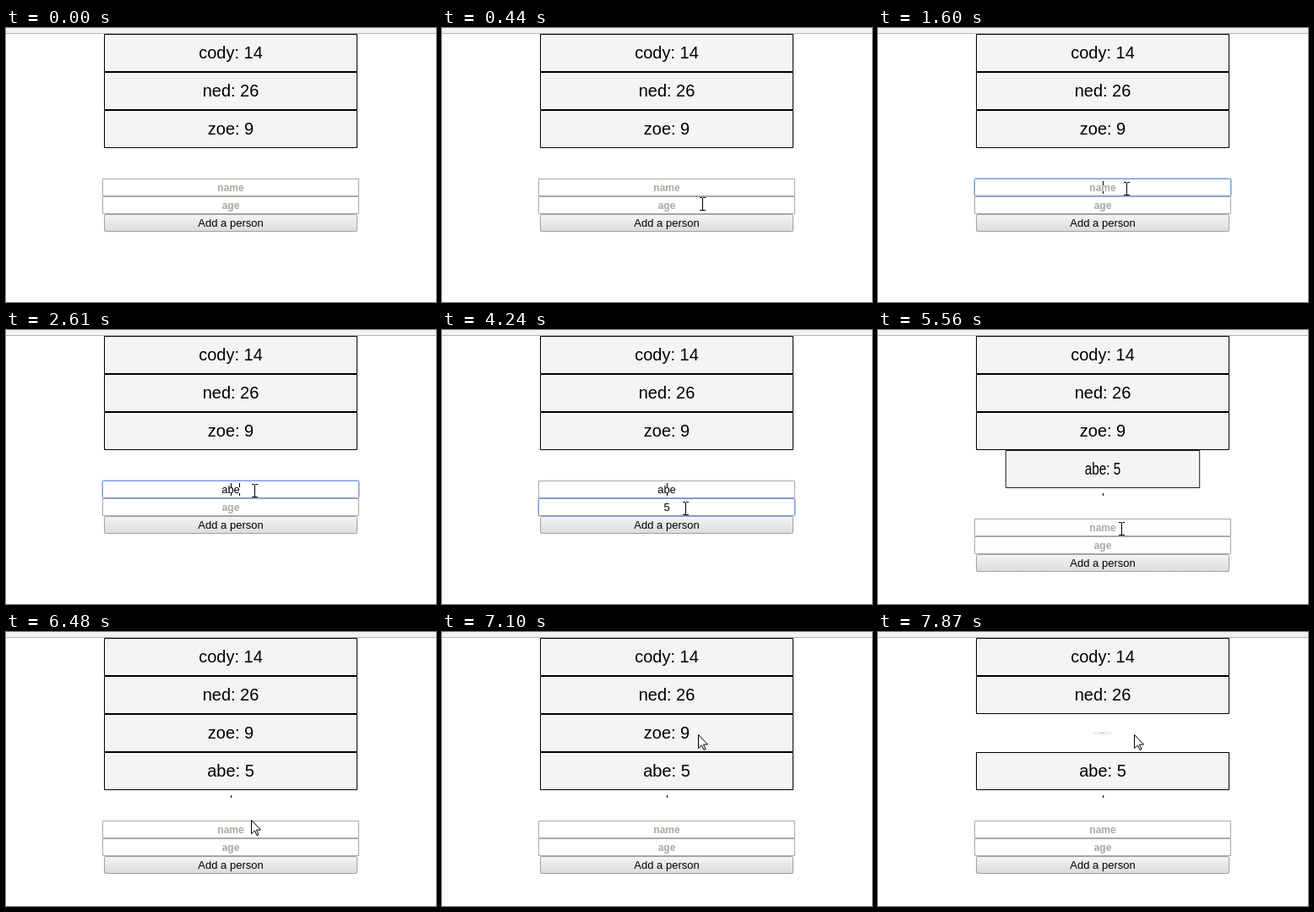
An HTML page with a canvas for the animation above (8 s loop, 509 by 324 pixels).

```html
<!DOCTYPE html>
<html>
<head>
<meta charset="utf-8">
<title>People list</title>
<style>
html, body { margin: 0; width: 100%; height: 100%; overflow: hidden; background: #fff; }
canvas { display: block; }
</style>
</head>
<body>
<canvas id="stage" width="509" height="324"></canvas>
<script>
const ctx = document.getElementById('stage').getContext('2d');
const LOOP = 8000, MID = 266, ADD = 5250, REMOVE = 7480;
const FAMILY = '"Liberation Sans", Arial, sans-serif';

// Movement happens in bursts: first step, last step, number of steps
const bursts = [[150, 740, 9], [2760, 3140, 6], [4390, 4790, 6],
                [ADD, 5710, 7], [6400, 7100, 10], [REMOVE, 7870, 6]];

// Pointer hot spot: time, x, y
const path = [[150, 428, 305], [445, 308, 208], [740, 294, 190], [2760, 294, 190],
              [3140, 288, 211], [4390, 288, 211], [4790, 286, 234], [ADD, 288, 235],
              [6400, 288, 235], [7100, 303, 121]];

const between = (t, a, b) => t >= a && t < b;
const clamp = v => Math.max(0, Math.min(1, v));

// Time of the latest movement step
function stepTime(t) {
  let last = 0;
  for (const [a, b, n] of bursts) {
    if (t < a) break;
    const d = (b - a) / (n - 1);
    last = a + Math.min(n - 1, Math.floor((t - a) / d + 0.1)) * d;
  }
  return last;
}

function pointerAt(t) {
  const i = path.findIndex(p => p[0] > t);
  if (i < 0) return path[path.length - 1].slice(1);
  const [t0, x0, y0] = path[i - 1], [t1, x1, y1] = path[i];
  const k = (t - t0) / (t1 - t0);
  return [Math.round(x0 + (x1 - x0) * k), Math.round(y0 + (y1 - y0) * k)];
}

function rect(x, y, w, h, color) {
  ctx.fillStyle = color;
  ctx.fillRect(x, y, w, h);
}

function outline(x, y, w, h, color, radius = 0) {
  ctx.beginPath();
  ctx.roundRect(x + 0.5, y + 0.5, w - 1, h - 1, radius);
  ctx.strokeStyle = color;
  ctx.lineWidth = 1;
  ctx.stroke();
}

function label(text, y, font, color) {
  ctx.font = font + ' ' + FAMILY;
  ctx.textAlign = 'center';
  ctx.fillStyle = color;
  ctx.fillText(text, MID, y);
}

function item(text, y, sx = 1, sy = 1) {
  if (sx <= 0) return;
  ctx.save();
  ctx.translate(MID, y + 22.5);
  ctx.scale(sx, sy);
  ctx.translate(-MID, -y - 22.5);
  rect(116, y, 300, 45, '#f4f4f4');
  outline(116, y, 300, 45, '#000');
  label(text, y + 29, '20px', '#000');
  ctx.restore();
}

function field(y, hint, value, focused, caret) {
  outline(114, y, 304, 21, focused ? '#7598dc' : '#a9a9a9', focused ? 1 : 0);
  if (focused) outline(113, y - 1, 306, 23, 'rgba(100,140,220,.4)', 2);
  if (value) label(value, y + 15, '13px', '#000');
  else label(hint, y + 15, 'bold 12px', '#a9a9a0');
  if (caret) {
    ctx.font = '13px ' + FAMILY;
    rect(Math.floor(MID + ctx.measureText(value).width / 2), y + 3, 1, 15, '#000');
  }
}

function button(y, hover, pressed) {
  const shades = pressed ? ['#dadada', '#f7f7f7'] : hover ? ['#f8f8f8', '#e0e0e0'] : ['#f5f5f5', '#dbdbdb'];
  const fill = ctx.createLinearGradient(0, y, 0, y + 21);
  shades.forEach((c, i) => fill.addColorStop(i, c));
  rect(116, y, 300, 21, fill);
  outline(116, y, 300, 21, '#a0a0a0', 2);
  label('Add a person', y + 15, '13px', pressed ? '#222' : '#000');
}

// Ends of a caret that stay behind when it blinks off
function caretRest(x, top) {
  if (top) rect(x, 181, 1, 5, '#000');
  rect(x, 193, 1, 3, '#000');
}

function beam(x, y) {
  rect(x, y - 7, 1, 15, '#000');
  for (const end of [y - 8, y + 7]) {
    rect(x - 3, end, 3, 1, '#000');
    rect(x + 1, end, 3, 1, '#000');
  }
}

function arrow(x, y) {
  const tip = [[0, 0], [0, 16], [4, 12.5], [6.5, 18], [8.5, 17], [6, 11.5], [11, 11.5]];
  ctx.beginPath();
  for (const [dx, dy] of tip) ctx.lineTo(x + 0.5 + dx, y + 0.5 + dy);
  ctx.closePath();
  ctx.fillStyle = '#fff';
  ctx.fill();
  ctx.strokeStyle = '#000';
  ctx.lineWidth = 1;
  ctx.stroke();
}

function draw(t) {
  const step = stepTime(t), added = t >= ADD, top = added ? 223 : 178;
  const typed = added ? 0 : [1750, 1900, 2070].filter(k => t >= k).length;
  const pointer = t >= 150 ? pointerAt(step) : null;
  const over = (y, h) => pointer && between(pointer[0], 114, 418) && between(pointer[1], y, y + h);

  rect(0, 0, 509, 324, '#fff');
  rect(0, 0, 509, 6, '#f2f2f2');
  rect(0, 6, 509, 1, '#b4b4b4');

  const shrink = t < REMOVE ? 1 : clamp((7903 - step) / 500);
  item('cody: 14', 7);
  item('ned: 26', 52);
  item('zoe: 9', 97, shrink, shrink);
  if (added) item('abe: 5', 142, clamp((step - 5173) / 500));

  field(top, 'name', 'abe'.slice(0, typed), between(t, 1050, 3310),
    between(t, 1050, 1600) || between(t, 1750, 2610));
  field(top + 21, 'age', between(t, 3690, ADD) ? '5' : '', between(t, 3310, 5100), between(t, 3310, 4240));
  button(top + 42, over(top + 42, 21), between(t, 5100, ADD));

  if (t >= 1600) caretRest(MID, !added);
  if (between(t, 2610, 2760)) caretRest(276, true);
  if (pointer) (over(top, 42) ? beam : arrow)(...pointer);
}

function tick() {
  draw(performance.now() % LOOP);
  requestAnimationFrame(tick);
}
tick();
</script>
</body>
</html>
```
